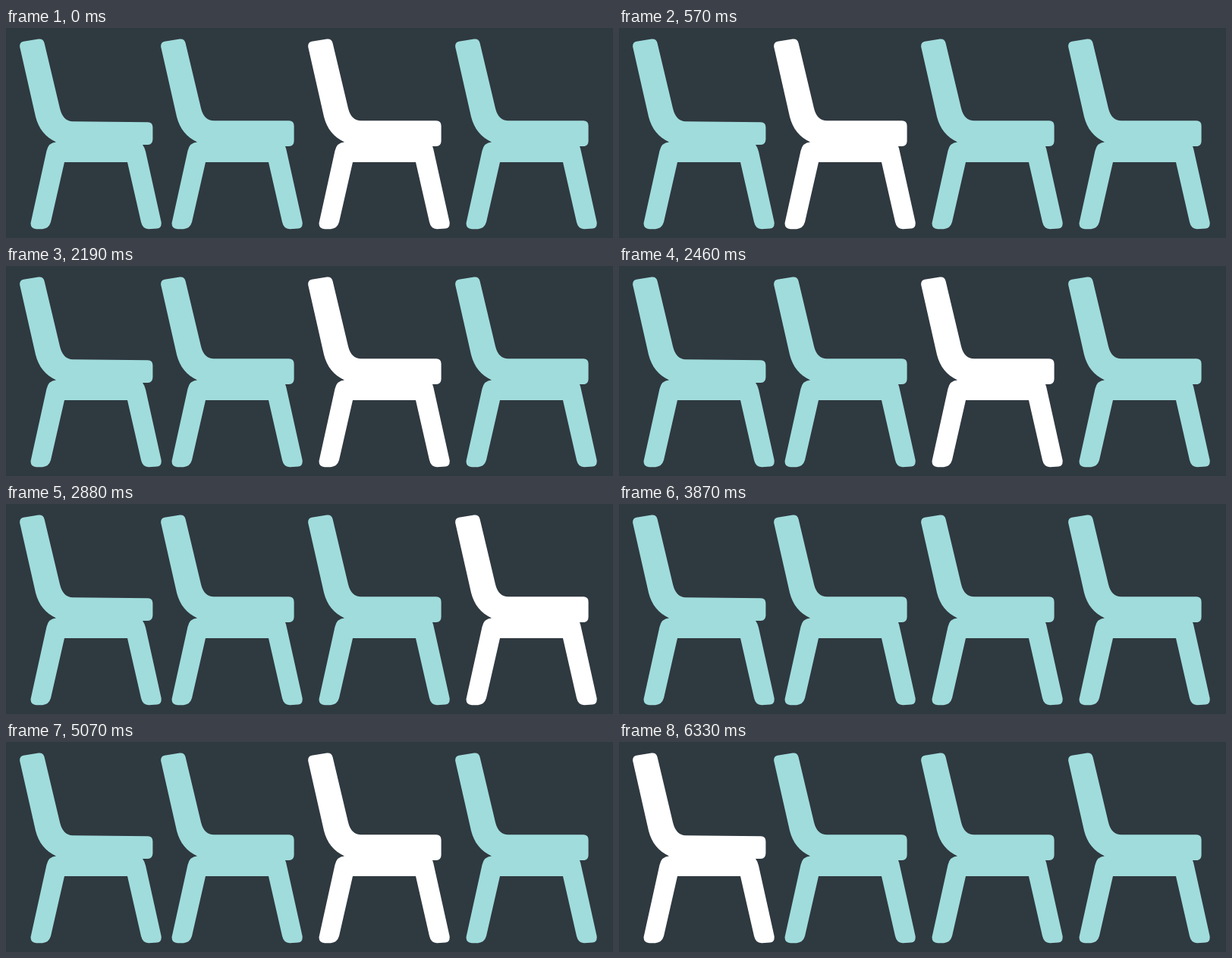
An HTML page for the animation above (6630 ms loop, 800 by 277 pixels).

```html
<!DOCTYPE html>
<html lang="en">
<head>
<meta charset="utf-8">
<title>Chairs</title>
<style>
html, body { margin: 0; width: 100%; height: 100%; overflow: hidden; background: #2f3940; }
svg { display: block; width: 100%; height: 100%; }
</style>
</head>
<body>
<svg id="stage" viewBox="0 0 800 277"></svg>
<script>
const LOOP = 6630;
const TEAL = '#a0dcdc', WHITE = '#ffffff';
const OFFSETS = [0, 186, 380, 574];

// [start in ms, highlighted chair]; -1 means none
const STEPS = [
  [0, 2], [480, -1], [510, 1], [1050, -1], [1440, 1],
  [1980, -1], [2010, 2], [2670, -1], [2700, 3],
  [3210, -1], [3240, 2], [3450, -1], [3480, 1], [3870, -1], [3930, 2],
  [4650, -1], [4680, 3], [5040, -1], [5070, 2], [5880, -1], [5910, 0]
];

const back = 'M18.2 25 Q17.6 19 23 17.8 L43 14.6 Q49 14 50.6 20 L71 106 ';
const legs = 'Q183 158 184 163 L204.6 256 Q205.5 264 199 264.6 L188 265.2 ' +
  'Q180 265 178 256 L160 177 H77 L59 256 Q56.5 264.5 48 265.2 H40 Q32 265 32.6 257 ' +
  'L53.5 162 Q56 151 66 150.5 C52 144 43 133 39 117 Z';
const seat = 'Q75 122.3 88 122.3 H187 Q193.6 122.5 193.6 129 V149 Q193.5 155.8 187 156 H182 ';
const slopedSeat = 'Q75 123 88 123.2 L187 124.2 Q193.4 124.4 193.4 131 V147 Q193 153.8 187 154 H180 ';

const stage = document.getElementById('stage');
const chairs = OFFSETS.map((x, i) => {
  const path = document.createElementNS(stage.namespaceURI, 'path');
  path.setAttribute('d', back + (i ? seat : slopedSeat) + legs);
  path.setAttribute('transform', `translate(${x})`);
  stage.append(path);
  return path;
});

function draw(t) {
  const active = STEPS.filter(([start]) => start <= t).pop()[1];
  chairs.forEach((chair, i) => chair.setAttribute('fill', i === active ? WHITE : TEAL));
}

const begin = performance.now();
function tick() {
  draw((performance.now() - begin) % LOOP);
  requestAnimationFrame(tick);
}
tick();
</script>
</body>
</html>
```
